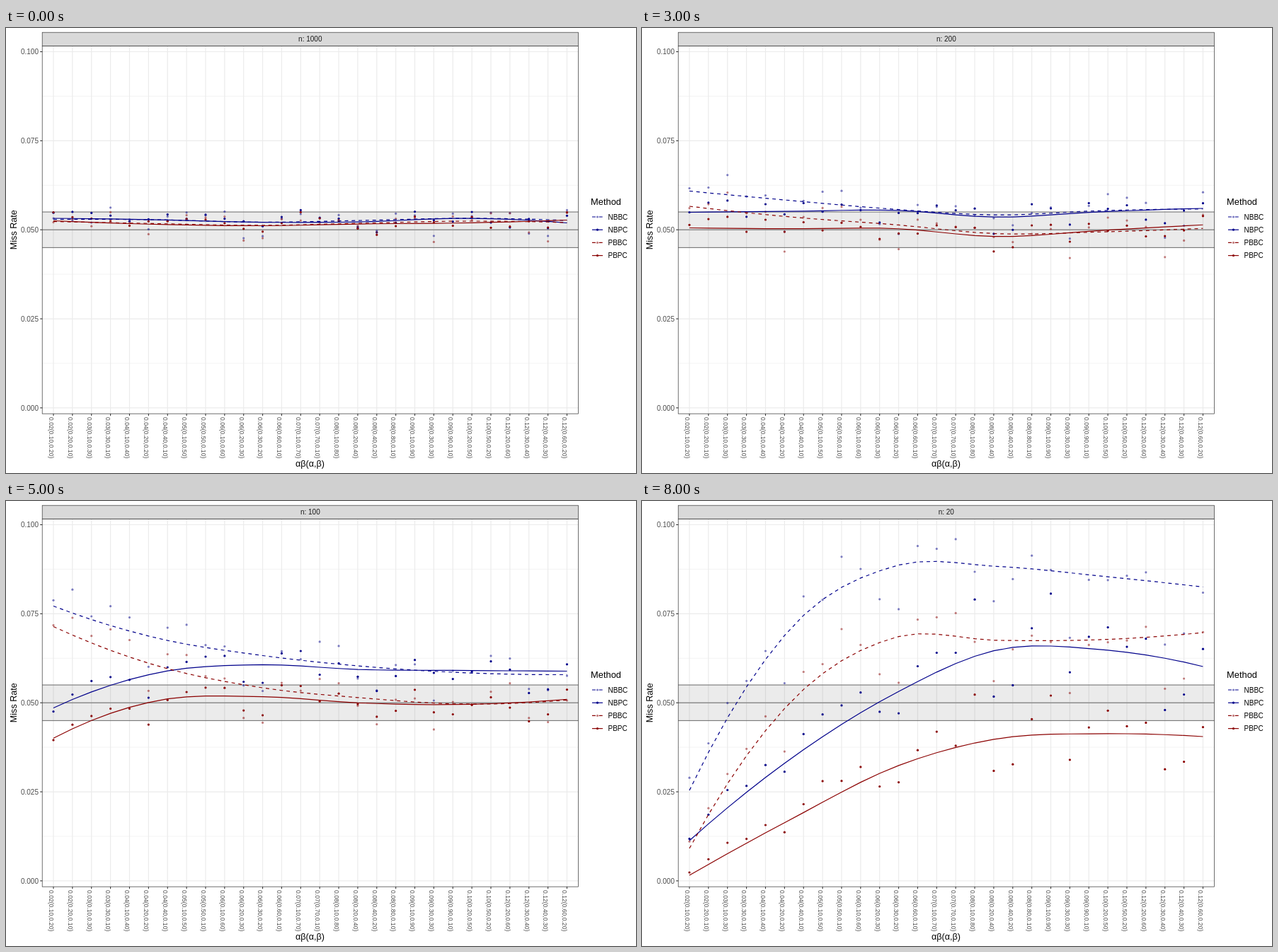
An HTML page for the animation above (9 s loop, 890 by 629 pixels).

```html
<!DOCTYPE html>
<html lang="en">
<head>
<meta charset="utf-8">
<title>Miss rate by sample size</title>
<style>
  html, body { margin: 0; width: 100%; height: 100%; overflow: hidden; background: #fff; }
  svg { display: block; width: 890px; height: 629px; }
  text { font-family: "Liberation Sans", Arial, sans-serif; }
  .tick { font-size: 10px; fill: #4d4d4d; }
  .cond { font-size: 8.6px; fill: #4d4d4d; }
  .title { font-size: 12.6px; }
  .head { font-size: 12.9px; }
  .strip { font-size: 10px; fill: #1a1a1a; }
  .key { font-size: 10px; }
  .mid { text-anchor: middle; }
  .end { text-anchor: end; }
  .page { visibility: hidden; animation: show 9s step-end infinite; }
  @keyframes show {
    0% { visibility: visible; }
    11.1111%, 100% { visibility: hidden; }
  }
</style>
</head>
<body>
<svg id="chart" viewBox="0 0 890 629"></svg>
<script>
const NS = 'http://www.w3.org/2000/svg';
const chart = document.getElementById('chart');
const L = 51.2, R = 808.5, T = 25.3, B = 545.2;

function add(parent, tag, attrs, label) {
  const el = document.createElementNS(NS, tag);
  for (const k in attrs) el.setAttribute(k, attrs[k]);
  if (label !== undefined) el.textContent = label;
  parent.appendChild(el);
  return el;
}
const line = (x1, y1, x2, y2, stroke, width) =>
  add(chart, 'line', { x1, y1, x2, y2, stroke, 'stroke-width': width });
const box = (y1, y2, attrs) =>
  add(chart, 'rect', { x: L, y: y1, width: R - L, height: y2 - y1, ...attrs });
const text = (parent, x, y, cls, label, turn) =>
  add(parent, 'text', { x, y, class: cls, ...(turn && { transform: `rotate(${turn} ${x} ${y})` }) }, label);

const xOf = i => 67 + i * 26.87;
const yOf = rate => 536.9 - rate * 5034;

const BLUE = '#00008b', RED = '#8b0000';
const series = [
  { name: 'NBBC', color: BLUE, boot: true },
  { name: 'NBPC', color: BLUE, boot: false },
  { name: 'PBBC', color: RED, boot: true },
  { name: 'PBPC', color: RED, boot: false }
];

// Every pair of tenths (alpha, beta), ordered by product
const pairs = [];
for (let p = 2; p <= 12; p++)
  for (let a = 1; a <= 9; a++)
    if (p % a === 0 && p / a <= 9) pairs.push({ a, b: p / a });
const last = pairs.length - 1;

// Each curve: six evenly spaced key heights in px, in the order of the series
const page = (n, ...curves) => ({ n, curves });
const blend = (n, p, q) => page(n, ...p.curves.map((c, j) => c.map((y, k) => (y + q.curves[j][k]) / 2)));

const n1000 = page(1000,
  [270.5, 271, 274.5, 272, 269, 272], [269, 271, 274.5, 274, 269, 275.5],
  [273.5, 276.5, 279, 276, 273, 275], [272.5, 277.5, 279.5, 277, 275.5, 271.5]);
const n250 = page(250,
  [267, 262, 268.5, 273.5, 263, 253.5], [266, 267.5, 267, 279.5, 266, 255],
  [281, 279.5, 286, 295.5, 287.5, 279], [283.5, 290.5, 290, 300.5, 285.5, 276]);
const n150 = page(150,
  [194, 226, 244, 255, 253.5, 258], [255, 250.5, 248.5, 255, 253.5, 255],
  [223, 255, 270, 286, 289, 287.5], [281.5, 277, 277, 289, 287, 280.5]);
const n75 = page(75,
  [103, 161, 191.5, 212, 232, 233], [330, 236, 214.5, 221.5, 225.5, 226],
  [132, 210, 256.5, 270.5, 285, 275], [389, 288, 276, 282, 288, 280]);
const n50 = page(50,
  [134, 113, 153, 187, 207, 208], [411, 249, 212, 208, 209.5, 216],
  [200, 174, 224, 257, 276, 264], [476, 324, 285.5, 287, 284.5, 272]);
const n20 = page(20,
  [409, 178, 92, 92.5, 106, 121.5], [480, 363, 272, 210.5, 210, 234],
  [491, 282, 193, 197, 196, 186], [529, 449, 376, 336, 329, 333]);
const pages = [n1000, blend(500, n1000, n250), n250, blend(200, n250, n150),
               n150, blend(100, n150, n75), n75, n50, n20];

// Catmull-Rom through the key heights, with parabolic ends
function smooth(k, u) {
  const end = k.length - 1, x = u * end;
  const at = j => j < 0 ? 3 * k[0] - 3 * k[1] + k[2]
    : j > end ? 3 * k[end] - 3 * k[end - 1] + k[end - 2] : k[j];
  const s = Math.min(Math.floor(x), end - 1), t = x - s;
  const a = at(s - 1), b = at(s), c = at(s + 1), d = at(s + 2);
  return b + t / 2 * (c - a + t * (2 * a - 5 * b + 4 * c - d + t * (3 * (b - c) + d - a)));
}

function seeded(seed) {
  return () => {
    seed = (seed * 1664525 + 1013904223) >>> 0;
    return seed / 2 ** 31 - 1;
  };
}

// Rise of a point above its curve: balanced pairs miss less, lopsided ones more
function rise({ a, b }, boot, n) {
  const gap = Math.abs(a - b), balanced = Math.min(a, b) > 1 && gap < 3;
  return boot
    ? (balanced ? 12 * gap - 50 : 15) * (1.8 - .45 * Math.log10(n))
    : (balanced ? -16 : a === 1 ? 3 * b : 3) * 11 / Math.sqrt(n);
}

const dot = (parent, x, y, s) => add(parent, 'circle',
  { cx: x, cy: y.toFixed(1), r: 1.6, fill: s.color, 'fill-opacity': s.boot ? .5 : 1 });
const stroke = s => ({ fill: 'none', stroke: s.color, 'stroke-width': 1.2,
  ...(s.boot && { 'stroke-dasharray': '4.9 4.9' }) });

function drawFrame() {
  for (let k = 0; k < 4; k++) {
    const y = yOf(.0125 + k * .025);
    line(L, y, R, y, '#ebebeb', .6);
  }
  for (let k = 0; k <= 4; k++) {
    const y = yOf(k * .025);
    line(L, y, R, y, '#ebebeb', 1.2);
    line(L - 3, y, L, y, '#333', 1.1);
    text(chart, 46, y + 3.6, 'tick end', (k * .025).toFixed(3));
  }
  pairs.forEach(({ a, b }, i) => {
    const x = xOf(i);
    line(x, T, x, B, '#ebebeb', 1.2);
    line(x, B, x, B + 3, '#333', 1.1);
    text(chart, x - 6.2, 550, 'cond', `${(a * b / 100).toFixed(2)}(0.${a}0,0.${b}0)`, 90);
  });
  box(yOf(.055), yOf(.045), { fill: '#000', 'fill-opacity': .08 });
  for (const rate of [.045, .05, .055]) line(L, yOf(rate), R, yOf(rate), '#686868', 1);
  const edge = { stroke: '#333', 'stroke-width': .7 };
  box(T, B, { fill: 'none', ...edge });
  box(6.2, T, { fill: '#d9d9d9', ...edge });
  text(chart, 429.5, 620, 'title mid', 'αβ(α,β)');
  text(chart, 15.5, 285.2, 'title mid', 'Miss Rate', -90);
}

function drawLegend() {
  text(chart, 826, 250, 'head', 'Method');
  series.forEach((s, i) => {
    const y = 267 + i * 18.2;
    add(chart, 'path', { d: `M828 ${y}H843`, ...stroke(s) });
    dot(chart, 835.5, y, s);
    text(chart, 850.5, y + 3.7, 'key', s.name);
  });
}

function drawPage({ n, curves }, index) {
  const g = add(chart, 'g', { class: 'page', style: `animation-delay:${index - pages.length}s` });
  text(g, 429.8, 19.3, 'strip mid', 'n: ' + n);
  const rnd = seeded(n * 7919 + 17);
  const noise = 8 + 70 / Math.sqrt(n);
  const shared = pairs.map(() => ({ true: rnd(), false: rnd() }));
  const fits = curves.map(k => pairs.map((_, i) => smooth(k, i / last)));

  series.forEach((s, j) => fits[j].forEach((y, i) => {
    const off = rise(pairs[i], s.boot, n) + noise * (shared[i][s.boot] + rnd() * .35);
    // low rates vary less
    const scale = Math.min(1.2, Math.sqrt((537 - y) / 280));
    dot(g, xOf(i), Math.max(46, Math.min(525, y - off * scale)), s);
  }));
  series.forEach((s, j) => add(g, 'polyline', {
    points: fits[j].map((y, i) => `${xOf(i).toFixed(2)},${y.toFixed(2)}`).join(' '), ...stroke(s)
  }));
}

drawFrame();
drawLegend();
pages.forEach(drawPage);
</script>
</body>
</html>
```
